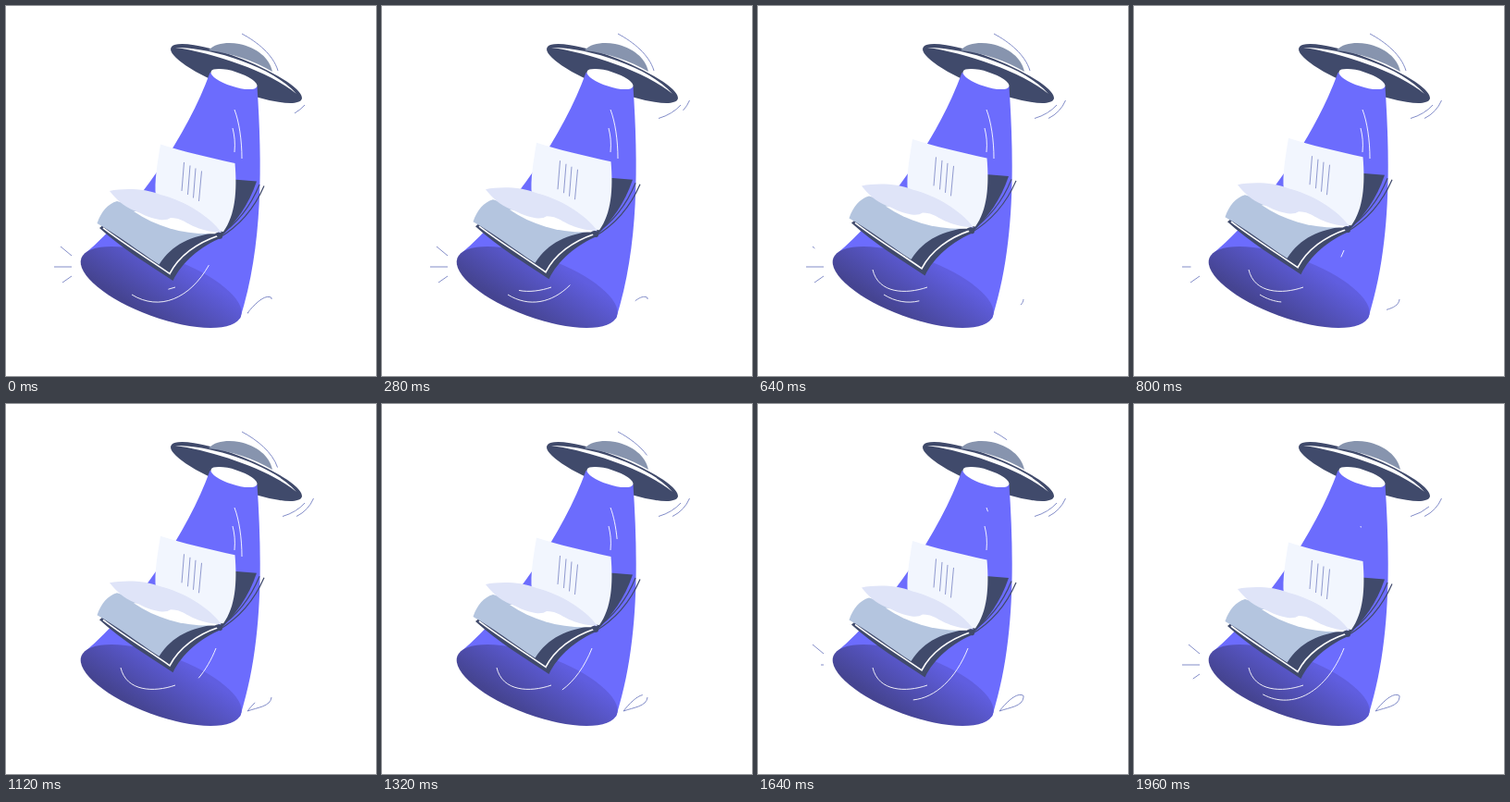
An HTML page that plays this animation: 400 by 400 pixels, repeating every 2 s.

```html
<!DOCTYPE html>
<html lang="en">
<head>
<meta charset="utf-8">
<title>Flying book</title>
<style>
  html, body { margin: 0; width: 100%; height: 100%; overflow: hidden; background: #fff; }
  svg { display: block; width: 100%; height: 100%; }
  .dark { fill: #404a6b; }
  .edge { fill: none; stroke: #404a6b; stroke-width: 1.2; }
  .text { fill: none; stroke: #7580c2; stroke-width: .8; }
  #lines { fill: none; stroke-width: .9; }
</style>
</head>
<body>
<svg viewBox="0 0 400 400">
  <defs>
    <!-- in the shadow ellipse's own rotated space -->
    <linearGradient id="shade" gradientUnits="userSpaceOnUse" x1="8" y1="-33" x2="-8" y2="33">
      <stop offset="0" stop-color="#605ee0"/>
      <stop offset="1" stop-color="#454491"/>
    </linearGradient>
  </defs>

  <!-- saucer -->
  <ellipse class="dark" rx="76" ry="16.9" transform="translate(249 73) rotate(21.5)"/>
  <path fill="#fff" d="M183 45C220 44 290 66 314 95C286 71 222 50 183 45Z"/>
  <path fill="#8794ae" d="M219 48C226 40 240 39 252 41C271 45 285 56 288 71C268 59 244 51 219 48Z"/>

  <!-- beam -->
  <path fill="#6c6cfd" d="M220.5 72C197 138 140 222 85 268L168 320L253 338C278 260 277 170 271.5 87Z"/>
  <ellipse fill="#fff" rx="26.2" ry="8" transform="translate(246.5 79) rotate(18)"/>
  <ellipse fill="url(#shade)" rx="91.8" ry="32.8" transform="translate(167.7 304) rotate(20)"/>

  <g id="book">
    <path class="dark" d="M240 187L271 189.5C262 216 249 233 231 251Z"/>
    <path class="edge" d="M279 194.5C268 220 252 238 230 251M274 193C264 218 249 236 229 249"/>
    <path fill="#f2f6fe" d="M167 149.5C190 157 220 164 247.5 170C250 200 248 226 235 244L200 240L162 206C160 190 164 168 167 149.5Z"/>
    <path class="text" d="M192.5 169L190 200M199 172.5L196.5 204M205 175.5L202.5 207.5M211.5 178.5L208.5 211"/>
    <path class="dark" d="M101 240L106 236L166 278C180 256 200 248 229 244L234 250C210 260 190 277 180.5 297C155 280 125 262 101 240Z"/>
    <path fill="none" stroke="#fff" stroke-width="1.6" d="M105 240C130 259 155 274 177 289.5C187 270 207 256 229 248.5"/>
    <path fill="#b4c5df" d="M98.5 235C103 222 110 214 120 211L190 232L229 244.5C200 249 180 257 165.5 279.5C143 265 120 247 98.5 235Z"/>
    <path fill="#fff" d="M138 222C165 240 195 248 230 246L225 236L175 222Z"/>
    <path fill="#dfe4f8" d="M112 200C127 197 150 197 167 204C192 210 220 227 233 245C204 243 196 233 186 230Q181 229 178 229Q174 232 166 231C153 229 147 224 138 221C128 217 119 209 112 200Z"/>
    <path class="dark" d="M226 246Q232 243 234 248Q234 253 230 251.5Z"/>
  </g>

  <g id="lines"></g>
</svg>
<script>
const LOOP = 2000, STEP = 40;
const BLUE = '#7580c2', WHITE = '#fff';

// path, colour, then passes: [grow from, grow to, erase from, erase to]
const LINES = [
  ['M294 70C289 53 272 39 255 30', BLUE, [-2, -1, 1100, 1860]],
  ['M323 107Q314 117 299 121.5', BLUE, [-200, 200, 1920, 2120]],
  ['M332.5 102Q327 115 314 121.5', BLUE, [120, 460, 2100, 2200]],
  ['M255 165C255 145 252 125 247 112', WHITE, [-2, -1, 1120, 1690]],
  ['M247 158C248 148 247 140 245 132', WHITE, [-2, -1, 1640, 1980]],
  ['M71 270L59 260', BLUE, [-2, -1, 480, 680], [1400, 1600, 2100, 2200]],
  ['M71 282H52', BLUE, [-2, -1, 700, 900], [1610, 1800, 2100, 2200]],
  ['M71 292L61 299', BLUE, [-2, -1, 840, 1040], [1830, 2010, 2100, 2200]],
  ['M183 304C160 312 130 311 124 285', WHITE, [-80, 635, 2100, 2200]],
  ['M227 264C208 312 170 333 136 312', WHITE, [-2, -1, -187, 1060], [715, 2000, 2100, 2200]],
  ['M287 317C286 327 272 328 261 332C268 323 278 313 285 314.5Q288 315 287 317', BLUE,
    [-2, -1, -430, 510], [550, 1412, 2100, 2200]],
];

const ramp = (t, from, to) => Math.min(1, Math.max(0, (t - from) / (to - from)));
const book = document.getElementById('book');
const group = document.getElementById('lines');

const strokes = LINES.flatMap(([d, stroke, ...passes]) => passes.map(times => {
  const path = document.createElementNS('http://www.w3.org/2000/svg', 'path');
  Object.entries({ d, stroke, pathLength: 1 }).forEach(([k, v]) => path.setAttribute(k, v));
  group.append(path);
  return { path, times };
}));

function draw(t) {
  const lift = 3.6 * (1 - Math.cos(2 * Math.PI * (t + 50) / LOOP));
  book.setAttribute('transform', `translate(0 ${-lift})`);
  for (const { path, times: [g0, g1, e0, e1] } of strokes) {
    const start = ramp(t, e0, e1), length = ramp(t, g0, g1) - start;
    path.setAttribute('visibility', length > 0 ? 'visible' : 'hidden');
    path.setAttribute('stroke-dasharray', `0 ${start} ${Math.max(0, length)} 2`);
  }
}

const origin = performance.now();
function tick() {
  const t = (performance.now() - origin) % LOOP;
  draw(Math.floor(t / STEP) * STEP);
  requestAnimationFrame(tick);
}
tick();
</script>
</body>
</html>
```
